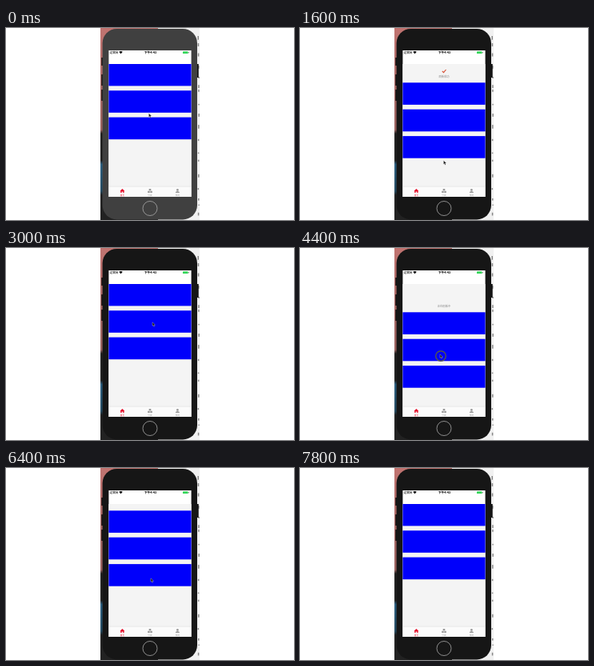
These frames come from a looping animation (360 by 240 pixels, 8000 ms). An HTML page:

```html
<!DOCTYPE html>
<html lang="zh">
<head>
<meta charset="utf-8">
<title>Pull to refresh</title>
<style>
  html, body { margin: 0; width: 100%; height: 100%; overflow: hidden; background: #fff; }
  svg { display: block; width: 360px; height: 240px; }
  text { font-family: "Noto Sans CJK SC", "Noto Sans CJK", "Noto Sans", sans-serif; text-anchor: middle; }
  .tab text { font-size: 2.7px; }
</style>
</head>
<body>
<svg viewBox="0 0 360 240">
  <defs>
    <linearGradient id="desk" x2="0" y2="1">
      <stop offset="0" stop-color="#c07370"/>
      <stop offset=".53" stop-color="#9a6360"/>
      <stop offset=".55" stop-color="#222"/>
      <stop offset=".69" stop-color="#222"/>
      <stop offset=".71" stop-color="#2c5f80"/>
      <stop offset=".85" stop-color="#254a60"/>
      <stop offset=".87" stop-color="#222"/>
    </linearGradient>
    <clipPath id="view"><rect x="128.4" y="45" width="103.2" height="153"/></clipPath>
  </defs>

  <!-- desktop behind the phone -->
  <rect x="118" width="72" height="240" fill="url(#desk)"/>
  <rect x="190" width="52" height="240" fill="#f1f1f1"/>
  <g id="specks" fill="#888"></g>

  <!-- phone -->
  <path d="M120.3 37v10M120.3 58v14M120.3 77v14M239.7 45v17" stroke="#111" stroke-width="2"/>
  <rect id="body" x="120.6" y="1" width="118.4" height="238.4" rx="18"/>
  <circle cx="180" cy="225.5" r="9" fill="none" stroke="#aaa" stroke-width=".8"/>
  <rect x="128.4" y="28" width="103.2" height="183" fill="#fff"/>

  <!-- list -->
  <g clip-path="url(#view)">
    <rect x="128" y="45" width="104" height="153" fill="#f4f4f4"/>
    <g id="list">
      <path id="tick" d="M177.8 30.4l1.7 1.7 3-3.6" fill="none" stroke="#d5482c" stroke-width="1.1"/>
      <text id="note" x="180" y="38.6" font-size="3.3" fill="#888"></text>
      <g id="cells" fill="#0000fb"></g>
    </g>
  </g>

  <!-- status bar -->
  <text x="135" y="32.1" font-size="3.6" font-weight="500">运营商</text>
  <path d="M141.2 29.8q2.3-1.8 4.6 0l-2.3 2.4z"/>
  <text x="180.5" y="32.1" font-size="3.8" font-weight="700">下午4:43</text>
  <rect x="221" y="29.2" width="6.6" height="2.9" rx=".7" fill="#35d65b"/>
  <path d="M228.4 30v1.3" stroke="#555" stroke-width=".7"/>

  <!-- tab bar -->
  <rect x="128.4" y="198" width="103.2" height="13" fill="#fbfbfb"/>
  <path d="M128.4 198.2h103.2" stroke="#ccc" stroke-width=".4"/>
  <g class="tab" fill="#e5112b">
    <path d="M142.4 203.8l3-2.8 3 2.8h-.8v2.3h-1.4v-1.5h-1.6v1.5h-1.4v-2.3z"/>
    <text x="145.4" y="209.8">首页</text>
  </g>
  <g class="tab" fill="#999">
    <path d="M178.7 201.1h2.6v2.2h-2.6zM177.2 203.8h2.5v2.2h-2.5zM180.3 203.8h2.5v2.2h-2.5z"/>
    <text x="180" y="209.8">分类</text>
  </g>
  <g class="tab" fill="#999">
    <circle cx="214.4" cy="202.4" r="1.4"/>
    <path d="M211.7 206.1q.3-2 2.7-2t2.7 2z"/>
    <text x="214.4" y="209.8">我的</text>
  </g>

  <!-- pointer -->
  <g id="pointer">
    <circle id="ring" r="6.3" fill="none" stroke="#55584a" stroke-width="1.4"/>
    <path d="M-1-2.2v4.5l1-.9.8 1.8.9-.4-.8-1.7h1.5z" fill="#111" stroke="#ddd" stroke-width=".35"/>
  </g>
</svg>
<script>
  const LOOP = 8000, STEP = 200;
  const HOLD = 23.5, PEAK = 35.5;               // header height, furthest drag
  const SETTLE = 200, DONE = 400, CLOSE = 800, REST = 1400;  // ms after release
  const pulls = [{ start: 200, release: 1000 }, { start: 3200, release: 4400 }];
  const nudge = { start: 5900, length: 600, height: 17 };
  const stops = [
    { t: 0, x: 179.5, y: 109 }, { t: 1600, x: 180.5, y: 168 }, { t: 3000, x: 184, y: 95 },
    { t: 4400, x: 176, y: 135 }, { t: 5400, x: 177, y: 142 }, { t: 6400, x: 182, y: 140 }
  ];

  const el = id => document.getElementById(id);
  const show = (id, on) => el(id).setAttribute("visibility", on ? "visible" : "hidden");
  const move = (id, x, y) => el(id).setAttribute("transform", `translate(${x} ${y})`);
  const mix = (a, b, k) => a + (b - a) * k;

  function ease(from, to, t) {
    const k = Math.min(1, Math.max(0, (t - from) / (to - from)));
    return k * k * (3 - 2 * k);
  }

  function rect(parent, x, y, width, height) {
    const node = document.createElementNS("http://www.w3.org/2000/svg", "rect");
    Object.entries({ x, y, width, height }).forEach(([k, v]) => node.setAttribute(k, v));
    el(parent).append(node);
  }

  for (let i = 0; i < 3; i++) rect("cells", 128, 44.8 + 33.4 * i, 104, 27.6);

  let seed = 7;
  const random = () => (seed = seed * 16807 % 2147483647) / 2147483647;
  for (let y = 10; y < 236; y += 5 + 14 * random()) rect("specks", 239.5 + random(), y, 1.5, 1 + 4 * random());

  function offset(t) {
    const k = (t - nudge.start) / nudge.length;
    const bump = k > 0 && k < 1 ? nudge.height * Math.sin(Math.PI * k) : 0;
    return pulls.reduce((sum, { start, release }) => sum
      + PEAK * ease(start, release, t)
      - (PEAK - HOLD) * ease(release, release + SETTLE, t)
      - HOLD * ease(release + CLOSE, release + REST, t), bump);
  }

  function pointer(t) {
    const i = stops.findLastIndex(s => s.t <= t);
    const a = stops[i], b = stops[i + 1] || a;
    const k = a === b ? 0 : ease(a.t, b.t, t);
    return [mix(a.x, b.x, k), mix(a.y, b.y, k)];
  }

  function draw(now) {
    const t = Math.floor(now % LOOP / STEP) * STEP;
    const y = offset(t);
    const pull = pulls.find(p => t >= p.start && t < p.release + REST);
    const done = !!pull && t >= pull.release + DONE;
    const busy = !!pull && !done && y >= HOLD;

    el("body").setAttribute("fill", t < STEP ? "#404040" : "#161616");
    el("note").textContent = done ? "刷新成功" : busy ? "正在刷新中" : "";
    move("list", 0, y);
    move("pointer", ...pointer(t));
    show("tick", done);
    show("ring", !!pull && t <= pull.release);
    show("pointer", t < 7400);
    if (t >= 7400) show("ring", false);
    requestAnimationFrame(draw);
  }
  draw(performance.now());
</script>
</body>
</html>
```
